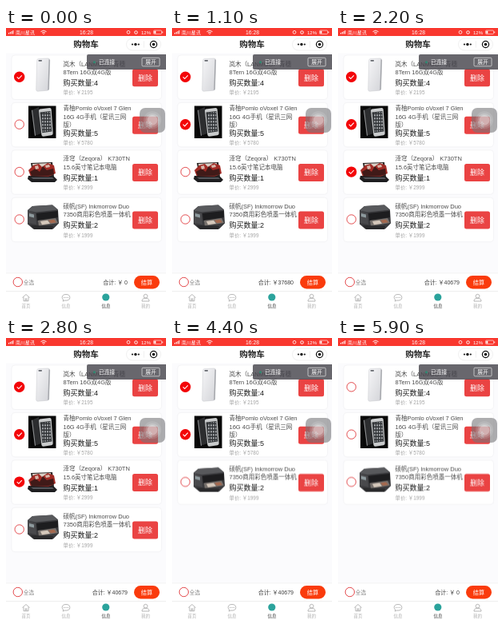
Write an HTML page that moves like this. It is 200 px wide and 353 px high and loops after 6000 ms.

```html
<!DOCTYPE html>
<html lang="zh-CN">
<head>
<meta charset="utf-8">
<title>购物车</title>
<style>
  html, body { margin: 0; width: 100%; height: 100%; overflow: hidden; background: #fff; }
  svg { display: block; width: 100vw; height: 100vh; }
  text { font-family: "Liberation Sans", "Noto Sans CJK SC", "Noto Sans CJK", sans-serif; }
  .name { font-size: 7.5px; fill: #4c4c4c; }
  .qty { font-size: 9px; fill: #1c1c1c; }
  .price { font-size: 6.4px; fill: #a4a4a4; }
  .sum { font-size: 7px; fill: #3c3c3c; }
  .tab { font-size: 5.5px; fill: #b0b0b0; }
  .ring { fill: #fff; stroke: #e0383c; stroke-width: .9; }

  .tick, .sum, #card2, #card3 { animation: 6s step-end infinite; }
  .tick, .sum { opacity: 0; }
  #tick0 { animation-name: tick0; }
  #tick1 { animation-name: tick1; }
  #tick2 { animation-name: tick2; }
  #tick3, #tickAll { animation-name: tickAll; }
  #card2 { animation-name: removed; }
  #card3 { animation-name: moveUp; }
  #sum0 { animation-name: sum0; }
  #sum1 { animation-name: sum1; }
  #sum2 { animation-name: sum2; }
  #sum3 { animation-name: sum3; }
  #sum4 { animation-name: sum4; }

  @keyframes tick0 { 0% { opacity: 1 } 93.33% { opacity: 0 } }
  @keyframes tick1 { 0% { opacity: 0 } 10% { opacity: 1 } 93.33% { opacity: 0 } }
  @keyframes tick2 { 0% { opacity: 0 } 28.33% { opacity: 1 } }
  @keyframes tickAll { 0% { opacity: 0 } 76.67% { opacity: 1 } 93.33% { opacity: 0 } }
  @keyframes removed { 0% { opacity: 1 } 51.67% { opacity: 0 } }
  @keyframes moveUp { 0% { transform: translateY(0) } 51.67% { transform: translateY(-59.4px) } }
  @keyframes sum0 { 0% { opacity: 1 } 3.33% { opacity: 0 } 95% { opacity: 1 } }
  @keyframes sum1 { 0% { opacity: 0 } 3.33% { opacity: 1 } 11.67% { opacity: 0 } }
  @keyframes sum2 { 0% { opacity: 0 } 11.67% { opacity: 1 } 30% { opacity: 0 } }
  @keyframes sum3 { 0% { opacity: 0 } 30% { opacity: 1 } 78.33% { opacity: 0 } }
  @keyframes sum4 { 0% { opacity: 0 } 78.33% { opacity: 1 } 95% { opacity: 0 } }
</style>
</head>
<body>
<svg viewBox="0 0 200 353" preserveAspectRatio="none">
  <defs>
    <linearGradient id="silver" x2="1" y2="1">
      <stop stop-color="#f6f6f8"/><stop offset="1" stop-color="#d3d4d8"/>
    </linearGradient>
    <pattern id="icons" width="3" height="4" patternUnits="userSpaceOnUse">
      <rect width="2" height="2.4" rx=".5" fill="#9a9da0"/>
    </pattern>

    <g id="photo0">
      <path d="M40.5 38.5l12-.5q2 0 2.2 2l-1 36q0 2-2 2.2l-12 1q-2 0-2-2l1-36.5q0-2 1.8-2.2z" fill="url(#silver)" stroke="#c6c8cc" stroke-width=".5"/>
      <path d="M53.6 39l1.3 1-1.2 37-1.4 1z" fill="#a3a5aa"/>
      <rect x="40.5" y="40" width="4.5" height="1.7" rx=".8" fill="#66696f"/>
    </g>
    <g id="photo1">
      <rect x="28" y="97.5" width="34.5" height="40.5" fill="#090909"/>
      <path d="M32 103l9-4 3 33-8 3z" fill="#2c2d2f"/>
      <path d="M32 103l1-.5 4 32-1 .5z" fill="#8d8f91"/>
      <path d="M42.5 101.5l12-1.5q2 0 2.2 2l2 30q0 2-2 2.2l-10 1.6q-2 0-2.3-2l-3.4-30q0-2 1.5-2.3z" fill="#c9cbcc"/>
      <path d="M42.5 105.5l13-1.6 1.8 25.6-12 1.7z" fill="#303336"/>
      <path d="M43.5 106.5l11.5-1.4 1.6 23.4-10.6 1.5z" fill="url(#icons)"/>
    </g>
    <g id="photo2">
      <path d="M31 169l27-1 2 18H34z" fill="#2a2423"/>
      <path d="M33 170l23-1 1.6 14H35z" fill="#d9d0c6"/>
      <path d="M28 178l6-6 7-2 4 4 7-5 8 3 2 10-9 4H31z" fill="#a12b25"/>
      <path d="M30 180l7-4 5 4 4-7 5 5 8-2 1 7-7 2H32z" fill="#401a18"/>
      <path d="M36 173l4-1 1 4-4 1zM49 172l5-1 1 3-5 1z" fill="#d8b9ac"/>
      <path d="M28 185l32 1 4 4-3 3H32l-5-4z" fill="#1e1e20"/>
      <path d="M31 187h27l2 2H34z" fill="#55555a"/>
    </g>
    <g id="photo3">
      <path d="M27 228l6-5 25-1.5 7 6 1 17-7 7H34l-7-6z" fill="#3a3a3d"/>
      <path d="M33 223l25-1.5 7 6-28 3-10-2z" fill="#58595c"/>
      <path d="M27 229l10 3 1 14-11-2z" fill="#49494c"/>
      <path d="M29 232l6 1.5v4l-6-1.5z" fill="#8d999d"/>
      <path d="M38 232l27-3v8l-26 4z" fill="#1d1d1f"/>
      <path d="M40 241l22-3 3 6-24 4z" fill="#77716d"/>
      <path d="M43 242l9-1.3 3 4-10 1.5z" fill="#d5c8bb"/>
      <path d="M53 240.7l7-1 3 3.6-7 1z" fill="#a5694f"/>
      <path d="M31 247l28 1-1 4H35z" fill="#29292b"/>
    </g>
    <g id="check">
      <circle r="6.7" fill="#f30508"/>
      <path d="M-3 0l2.2 2.2L3.1-2" fill="none" stroke="#fff" stroke-width="1.1"/>
    </g>
  </defs>

  <rect width="200" height="353" fill="#fff"/>
  <rect y="31.5" width="200" height="275.5" fill="#fbfbfd"/>

  <!-- status bar -->
  <rect width="200" height="10" fill="#f9382f"/>
  <g fill="#fff" font-size="6">
    <path d="M3 7.6v-1.6h1v1.6zM4.8 7.6V5h1v2.6zM6.6 7.6V4h1v3.6zM8.4 7.6V3h1v4.6z"/>
    <text x="12" y="7.6">南川星讯</text>
    <path d="M43.5 4.6q3.5-3 7 0M45 6.2q2-1.6 4 0" fill="none" stroke="#fff" stroke-width=".9"/>
    <circle cx="47" cy="7.4" r=".7"/>
    <text x="100.5" y="7.6" text-anchor="middle" font-size="6.8">16:28</text>
    <circle cx="153" cy="5.3" r="1.9" fill="none" stroke="#fff" stroke-width=".8"/>
    <circle cx="162.5" cy="5.5" r="1.8" fill="none" stroke="#fff" stroke-width="1"/>
    <text x="169" y="7.6">12%</text>
    <rect x="184.5" y="3" width="10" height="4.6" rx="1" fill="none" stroke="#fff" stroke-width=".6"/>
    <path d="M185.3 3.8h2v3h-2zM195.3 4.4h.9v1.8h-.9z"/>
  </g>

  <!-- title bar -->
  <text x="100" y="24" text-anchor="middle" font-size="10.5" font-weight="700" fill="#222">购物车</text>
  <rect x="150.5" y="13" width="43" height="15" rx="7.5" fill="#fff" stroke="#e4e4e4" stroke-width=".6"/>
  <path d="M172.3 16.5v8" stroke="#e2e2e2" stroke-width=".6"/>
  <g fill="#111">
    <circle cx="158" cy="20.5" r="1.1"/><circle cx="161.9" cy="20.5" r="1.7"/><circle cx="165.8" cy="20.5" r="1.1"/>
    <circle cx="184.5" cy="20.5" r="1.8"/>
  </g>
  <circle cx="184.5" cy="20.5" r="4.1" fill="none" stroke="#111" stroke-width="1.2"/>

  <g id="list"></g>

  <!-- connection banner -->
  <path d="M103 33h97v19h-97q-2 0-2-2V35q0-2 2-2z" fill="#47464e" fill-opacity=".82"/>
  <circle cx="110.5" cy="42.8" r="1.5" fill="#2f8a72"/>
  <g fill="#fff" font-size="6.8">
    <text x="116" y="45.3">已连接</text>
    <rect x="170" y="37.3" width="22" height="10.5" rx="1.2" fill="none" stroke="#e8e8e8" stroke-width=".7"/>
    <text x="181" y="45.1" text-anchor="middle">展开</text>
  </g>

  <!-- floating button -->
  <rect x="167" y="100" width="32" height="31" rx="7" fill="#77777a" fill-opacity=".6"/>
  <g fill="#fff">
    <circle cx="183" cy="115.3" r="11" fill-opacity=".12"/>
    <circle cx="183" cy="115.3" r="8.6" fill-opacity=".18"/>
    <circle cx="183" cy="115.3" r="6.4" fill-opacity=".3"/>
  </g>

  <!-- checkout bar -->
  <path d="M0 307h200" stroke="#ececec" stroke-width=".6"/>
  <circle class="ring" cx="14.8" cy="318" r="5.7"/>
  <g id="tickAll" class="tick"><use href="#check" x="14.8" y="318"/></g>
  <text x="21.8" y="320.6" font-size="6.6" fill="#8a8a8a">全选</text>
  <g id="sums"></g>
  <rect x="160" y="310" width="32" height="16.5" rx="8.2" fill="#fa3b0c"/>
  <text x="176" y="321" text-anchor="middle" font-size="7.2" fill="#fff">结算</text>

  <!-- tab bar -->
  <path d="M0 329.5h200" stroke="#e2e2e2" stroke-width=".6"/>
  <g fill="none" stroke="#9a9a9a" stroke-width=".7">
    <path d="M20.5 337.5l4.5-4 4.5 4M22 336.8v4.9h6v-4.9M24.2 341.5v-2.6h1.7v2.6"/>
    <path d="M73 341l-1.8 1.1.4-2q-1.4-1.2-1.4-2.8 0-3.8 4.8-3.8t4.8 3.8-4.8 3.8z"/>
    <circle cx="174.5" cy="335.7" r="2.4"/>
    <path d="M170 342q0-3.8 4.5-3.8t4.5 3.8z"/>
  </g>
  <g fill="#9a9a9a"><circle cx="72.8" cy="337.3" r=".6"/><circle cx="75" cy="337.3" r=".6"/><circle cx="77.2" cy="337.3" r=".6"/></g>
  <circle cx="124.8" cy="337" r="4.6" fill="#2ba39c"/>
  <g text-anchor="middle">
    <text class="tab" x="25" y="350">首页</text>
    <text class="tab" x="75" y="350">信息</text>
    <text class="tab" x="125" y="350" style="fill:#444">信息</text>
    <text class="tab" x="174.5" y="350">我的</text>
  </g>
</svg>
<script>
  const items = [
    { name: ['岚木（LANMOO）青穗', '8Tern 16G双4G版'], qty: 4, price: 2195 },
    { name: ['青柚Pomlo oVoxel 7 Glen', '16G 4G手机（星讯三网', '版）'], qty: 5, price: 5780 },
    { name: ['泽穹（Zeqora） K730TN', '15.6英寸笔记本电脑'], qty: 1, price: 2999 },
    { name: ['硕帆(SF) Inkmorrow Duo', '7350商用彩色喷墨一体机'], qty: 2, price: 1999 }
  ];
  const pitch = 59.4;
  const label = (cls, y, s) => `<text class="${cls}" x="71.5" y="${y}">${s}</text>`;

  function card({ name, qty, price }, i) {
    const top = 34 + i * pitch, mid = top + 28;
    const long = name.length > 2;
    const first = top + (long ? 10 : 13.5);
    const lines = name.map((s, n) => label('name', first + n * 10.5, s)).join('');
    return `<g id="card${i}">
      <rect x="7" y="${top}" width="187.5" height="55.5" rx="4" fill="#fff" stroke="#f0f0f3" stroke-width=".7"/>
      <circle class="ring" cx="16.7" cy="${mid - .7}" r="5.7"/>
      <g id="tick${i}" class="tick"><use href="#check" x="16.7" y="${mid - .7}"/></g>
      <use href="#photo${i}"/>
      ${lines}
      ${label('qty', top + (long ? 42 : 38), '购买数量:' + qty)}
      ${label('price', top + (long ? 52.5 : 49.3), '单价: ￥' + price)}
      <rect x="158" y="${mid - 10.7}" width="32" height="22" rx="2.5" fill="#ea4343"/>
      <text x="174" y="${mid + 3.5}" text-anchor="middle" font-size="9" fill="#fff">删除</text>
    </g>`;
  }

  document.getElementById('list').innerHTML = items.map(card).join('');
  document.getElementById('sums').innerHTML = [' 0', 8780, 37680, 40679, 41678].map((v, i) =>
    `<text id="sum${i}" class="sum" x="152" y="320.6" text-anchor="end">合计: ￥${v}</text>`).join('');
</script>
</body>
</html>
```
